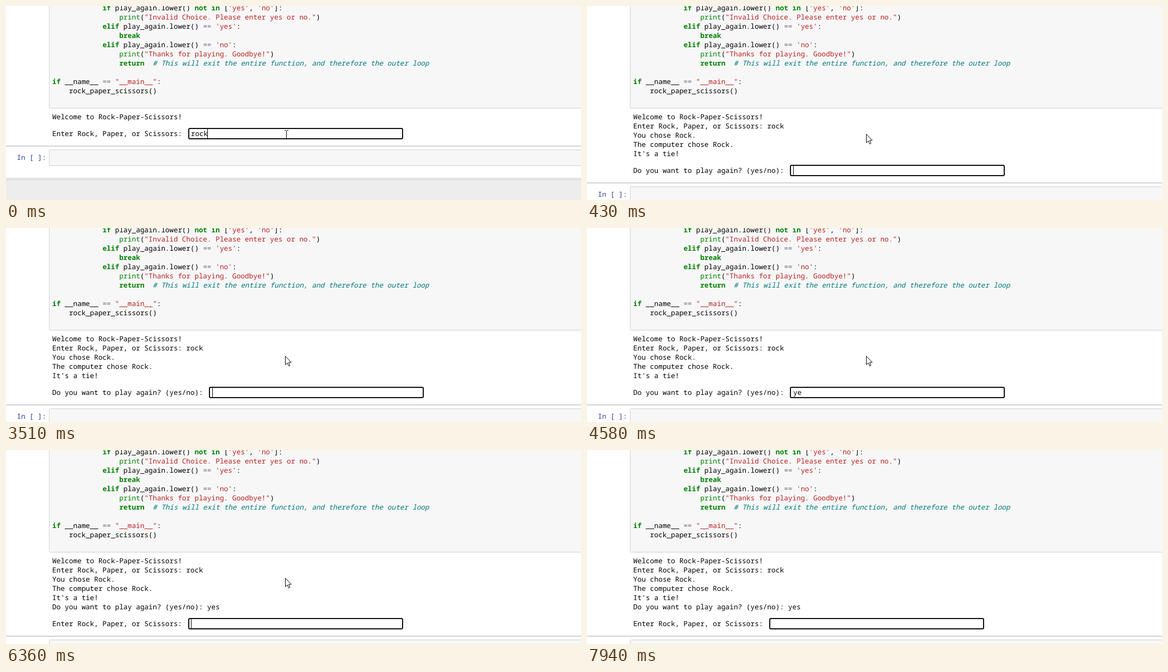
These frames come from a looping animation (1057 by 358 pixels, 8000 ms). An HTML page:

```html
<!DOCTYPE html>
<html lang="en">
<head>
<meta charset="utf-8">
<title>Notebook game</title>
<style>
  html, body { margin: 0; width: 100%; height: 100%; overflow: hidden; background: #fff; }
  svg { display: block; width: 1057px; height: 358px; }
  text {
    font: 12.83px "Noto Sans Mono", "DejaVu Sans Mono", monospace;
    white-space: pre;
    text-rendering: geometricPrecision;
    fill: #000;
  }
  .k { fill: #008000; font-weight: bold; }
  .b { fill: #008000; }
  .s { fill: #ba2121; }
  .o { fill: #6c5f7c; }
  .c { fill: #007979; font-style: italic; }
  .in { fill: #303f9f; }
  .cell { fill: #f7f7f7; stroke: #cfcfcf; }
  .field { fill: #fff; stroke: #0c0c0c; stroke-width: 2; }
</style>
</head>
<body>
<svg viewBox="0 0 1057 358">
  <rect class="cell" x="79.5" y="-10.5" width="1000" height="199" rx="2"/>
  <g id="code"></g>
  <g id="out"></g>
  <g id="next">
    <path d="M0 258.5H1057" stroke="#ababab"/>
    <rect class="cell" x="79.5" y="265.5" width="1000" height="29" rx="2"/>
    <text class="in" x="20" y="284">In [ ]:</text>
    <rect y="317" width="1057" height="120" fill="#ededed"/>
    <rect y="317" width="1057" height="5" fill="#e3e3e3"/>
  </g>
  <g id="prompt">
    <text id="ask" x="85" y="240"></text>
    <g id="box">
      <rect class="field" x="1" y="226" width="393" height="19" rx="2"/>
      <text id="typed" y="240"></text>
      <rect id="caret" y="227" width="1" height="17"/>
    </g>
  </g>
  <path id="beam" d="M-3.5 -7.5H-1L0 -6.5L1 -7.5H3.5M0 -6.5V6.5M-3.5 7.5H-1L0 6.5L1 7.5H3.5"
        fill="none" stroke="#000"/>
  <path id="arrow" d="M.5 .5V16.3L4.1 12.9L6.6 18.6L9 17.6L6.6 12H11.4Z" fill="#fff" stroke="#000"/>
</svg>
<script>
const LOOP = 8000, CHAR = 7.698, LEFT = 85, LINE = 17;
const $ = id => document.getElementById(id);

function addText(parent, str, x, y, cls) {
  const el = document.createElementNS("http://www.w3.org/2000/svg", "text");
  el.setAttribute("x", x);
  el.setAttribute("y", y);
  if (cls) el.setAttribute("class", cls);
  el.textContent = str;
  parent.append(el);
}

// Each row: baseline row, start column, then [style, text] tokens.
const code = [
  [0, 12, ["k", "if"], ["", " play_again.lower() "], ["k", "not in"], ["", " ["],
    ["s", "'yes'"], ["", ", "], ["s", "'no'"], ["", "]:"]],
  [1, 16, ["b", "print"], ["", "("], ["s", '"Invalid Choice. Please enter yes or no."'], ["", ")"]],
  [2, 12, ["k", "elif"], ["", " play_again.lower() "], ["o", "=="], ["", " "], ["s", "'yes'"], ["", ":"]],
  [3, 16, ["k", "break"]],
  [4, 12, ["k", "elif"], ["", " play_again.lower() "], ["o", "=="], ["", " "], ["s", "'no'"], ["", ":"]],
  [5, 16, ["b", "print"], ["", "("], ["s", '"Thanks for playing. Goodbye!"'], ["", ")"]],
  [6, 16, ["k", "return"], ["", "  "],
    ["c", "# This will exit the entire function, and therefore the outer loop"]],
  [8, 0, ["k", "if"], ["", " __name__ "], ["o", "=="], ["", " "], ["s", '"__main__"'], ["", ":"]],
  [9, 4, ["", "rock_paper_scissors()"]]
];
for (const [row, start, ...tokens] of code) {
  let col = start;
  for (const [cls, str] of tokens) {
    const pad = str.length - str.trimStart().length;
    addText($("code"), str.trim(), LEFT + (col + pad) * CHAR, 8 + row * LINE, cls);
    col += str.length;
  }
}

const askMove = "Enter Rock, Paper, or Scissors: ";
const askAgain = "Do you want to play again? (yes/no): ";
const log = ["Welcome to Rock-Paper-Scissors!", askMove + "rock", "You chose Rock.",
  "The computer chose Rock.", "It's a tie!", askAgain + "yes"];

// Every track is a list of [start time, value].
const stages = [
  [0, { lines: 1, ask: askMove, x: 335, textX: 340 }],
  [430, { lines: 5, ask: askAgain, x: 373, textX: 379 }],
  [6360, { lines: 6, ask: askMove, x: 335, textX: 340 }]
];
const typing = [[0, "rock"], [430, ""], [3920, "y"], [4050, "ye"], [4720, "yes"], [6360, ""]];
const blink = [[0, 1], [940, 0], [1450, 1], [1950, 0], [2450, 1], [3000, 0], [3510, 1],
  [4580, 0], [4720, 1], [5220, 0], [5720, 1], [6860, 0], [7420, 1], [7940, 0]];
const mouse = [
  [0, ["beam", 515.5, 237]], [280, ["arrow", 513, 236]], [6990, ["arrow", 630, 228]],
  [7140, ["arrow", 717, 192]], [7290, ["beam", 838.5, 166]], [7420, ["beam", 948.5, 145]],
  [7550, ["", 0, 0]]
];

const at = (track, t) => track.findLast(step => step[0] <= t)[1];
const move = (id, x, y) => $(id).setAttribute("transform", `translate(${x} ${y})`);
const show = (id, on) => $(id).setAttribute("visibility", on ? "visible" : "hidden");

let stage, value;
function draw(now) {
  const t = now % LOOP;
  const s = at(stages, t), v = at(typing, t), [kind, mx, my] = at(mouse, t);
  if (s !== stage) {
    stage = s;
    $("out").replaceChildren();
    log.slice(0, s.lines).forEach((str, i) => addText($("out"), str, LEFT, 209 + i * LINE));
    const shift = (s.lines - 1) * LINE;
    move("next", 0, shift);
    move("prompt", 0, shift);
    move("box", s.x, 0);
    $("ask").textContent = s.ask;
    $("typed").setAttribute("x", s.textX - s.x);
    value = null;
  }
  if (v !== value) {
    value = v;
    $("typed").textContent = v;
    $("caret").setAttribute("x", Math.floor(s.textX + v.length * CHAR) - s.x);
  }
  show("caret", at(blink, t));
  for (const id of ["beam", "arrow"]) {
    show(id, id === kind);
    if (id === kind) move(id, mx, my);
  }
}

function tick() {
  draw(performance.now());
  requestAnimationFrame(tick);
}
tick();
</script>
</body>
</html>
```
